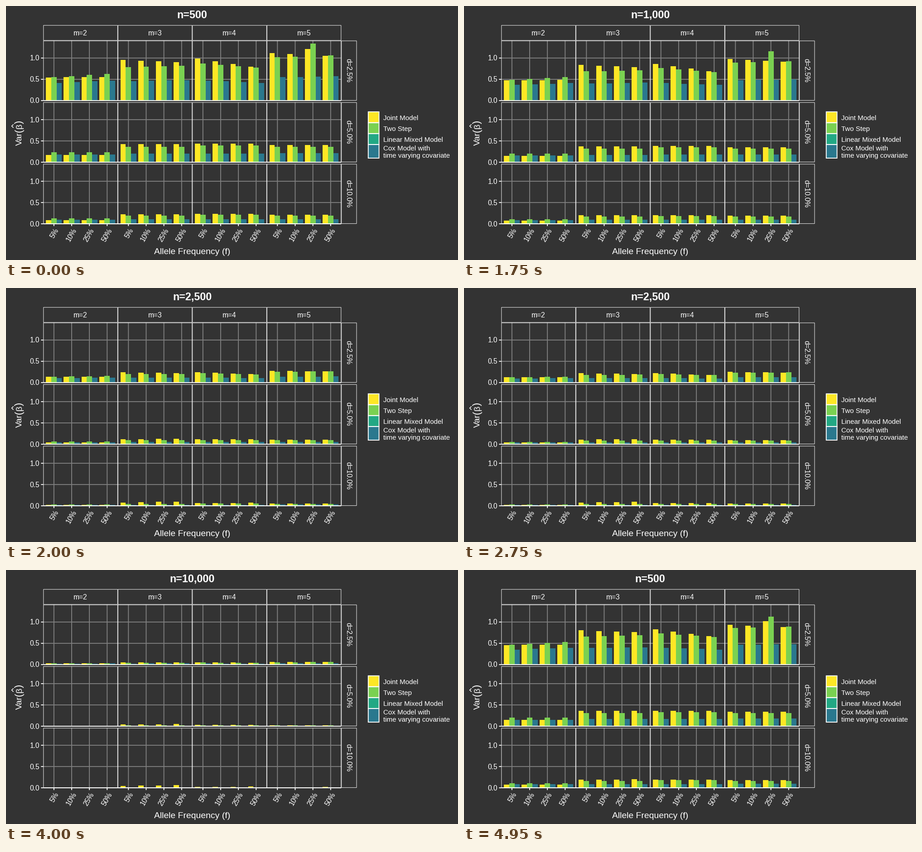
A matplotlib script for the animation above (5 s loop, 998 by 561 pixels).

```python
import numpy as np
import matplotlib.pyplot as plt
from matplotlib.animation import FuncAnimation
from matplotlib.patches import Rectangle

W, H, DPI = 998, 561, 128
PT = 72 / DPI                      # points per pixel
BG, GRID, FG = "#333333", "#7f7f7f", "white"
YELLOW, GREEN, TEAL, BLUE = "#fde725", "#7ad151", "#22a884", "#2a788e"
SMALL, MEDIUM, LARGE = 15.55, 19.44, 23.3
LINE = 1.89

SIZES = ["n=500", "n=1,000", "n=2,500", "n=5,000", "n=10,000"]
FREQS = ["5%", "10%", "25%", "50%"]
DROPOUT = ["d=2.5%", "d=5.0%", "d=10.0%"]

LEFT, PANEL_W, PANEL_H, STRIP = 82.3, 164.5, 132.4, 34.2
EDGES = LEFT + PANEL_W * np.arange(5)
BASES = 208.9 + 136.1 * np.arange(3)
RIGHT, TOP = EDGES[-1], BASES[0] - PANEL_H
UNIT = 94
STEP = PANEL_W / 4.2
BAR = 0.3 * STEP


def variances():
    """Bar heights with axes: n, method, dropout, m, frequency."""
    low = np.array([[0.55, 0.93, 0.89, 1.08],
                    [0.59, 0.80, 0.82, 1.04],
                    [0.445, 0.47, 0.445, 0.56]])
    mid = np.array([[0.172, 0.425, 0.434, 0.405],
                    [0.235, 0.367, 0.397, 0.367],
                    [0.183, 0.20, 0.203, 0.21]])
    base = np.stack([low, mid, 0.53 * mid], axis=1)[..., None]

    # Only the lowest dropout shows a trend over allele frequency
    f = np.linspace(-0.5, 0.5, 4)
    tilt = np.add.outer([-0.1, 0, 0], [0.12, 0.04, -0.12, 0.04])
    trend = np.ones((3, 3, 4, 4))
    trend[:, 0] += tilt[..., None] * f

    # The joint model keeps a bias that large samples do not remove
    bias = np.zeros((3, 3, 4, 4))
    bias[0] = np.multiply.outer(
        np.outer([0, 0.022, 0.045], [0, 1, 0.3, 0.1]), 1 + 0.6 * f)

    scale = np.reshape([1, 1, 0.25, 0.114, 0.055], (5, 1, 1, 1, 1))
    v = scale * base * trend + (1 - scale) * bias

    # Outliers in small samples at m=5, f=25%
    v[0, 0, 0, 3, 2] *= 1.13
    v[:2, 1, 0, 3, 2] *= 1.275
    return v


states = variances()

plt.rcParams["font.family"] = "Liberation Sans"
fig = plt.figure(figsize=(W / DPI, H / DPI), dpi=DPI, facecolor=BG)
ax = fig.add_axes([0, 0, 1, 1])
ax.set(xlim=(0, W), ylim=(H, 0))
ax.axis("off")


def text(x, y, s, size=SMALL, ha="center", angle=0, **kw):
    return ax.text(x, y, s, size=size * PT, color=FG, ha=ha, va="baseline",
                   rotation=angle, rotation_mode="anchor", **kw)


def line(x, y, color=FG, width=LINE, z=4):
    ax.plot(x, y, color=color, lw=width * PT, zorder=z, snap=False,
            solid_capstyle="butt")


def fill(x, y, w, h, color):
    return ax.add_patch(Rectangle((x, y), w, h, fc=color, ec="none", lw=0,
                                  antialiased=False, zorder=2))


def frame(x, y, w, h):
    """Border whose outer half is clipped away."""
    t = LINE / 2
    ax.add_patch(Rectangle((x + t / 2, y + t / 2), w - t, h - t, fill=False,
                           ec=FG, lw=t * PT, snap=False, zorder=3))


def center(m, f):
    return EDGES[m] + (0.6 + f) * STEP


# Panels, strips and axes
for m, x0 in enumerate(EDGES[:-1]):
    frame(x0, TOP - STRIP, PANEL_W, STRIP)
    text(x0 + PANEL_W / 2, 65, f"m={m + 2}")
    for base in BASES:
        frame(x0, base - PANEL_H, PANEL_W, PANEL_H)
    for f, label in enumerate(FREQS):
        x = center(m, f)
        for base in BASES:
            line([x, x], [base - PANEL_H, base], GRID, z=1)
        line([x, x], [BASES[-1], BASES[-1] + 5])
        text(x + 11, 494.8, label, ha="right", angle=60)

for base, label in zip(BASES, DROPOUT):
    line([LEFT, RIGHT], [base, base])
    frame(RIGHT, base - PANEL_H, STRIP, PANEL_H)
    text(751.8, base - PANEL_H / 2, label, angle=270)
    for v in (0, 0.5, 1):
        y = base - v * UNIT
        if v:
            line([LEFT, RIGHT], [y, y], GRID, z=1)
        line([LEFT - 5, LEFT], [y, y])
        text(74, y + 5.5, f"{v:.1f}", ha="right")

text(410.8, 547.5, "Allele Frequency (f)", MEDIUM)
for y, s, size in ((308, "Var", MEDIUM), (279, "(", 22),
                   (271.3, "β", MEDIUM), (259.5, ")", 22)):
    text(34.5, y, s, size, ha="left", angle=90)
line([16.5, 12.5, 16.5], [269, 265.2, 261.4], width=1.5)

# Legend
keys = [233.7, 257.7, 281.8, 305.9, 336]
for y0, y1, color in zip(keys, keys[1:], (YELLOW, GREEN, TEAL, BLUE)):
    fill(799.8, y0, 23.8, y1 - y0, color)
    ax.add_patch(Rectangle((799.8, y0), 23.8, y1 - y0, fill=False, ec=FG,
                           lw=LINE * PT, snap=False, zorder=3))
for y, s in ((251.5, "Joint Model"), (275.5, "Two Step"),
             (299.5, "Linear Mixed Model"), (318.7, "Cox Model with"),
             (335.2, "time varying covariate")):
    text(833.3, y, s, 15.15, ha="left")

title = text(411.2, 26.8, "", LARGE, weight="bold")
bars = []
for k, color in enumerate((YELLOW, GREEN, BLUE)):
    for base in BASES:
        for m in range(4):
            for f in range(4):
                x = center(m, f) + (k - 1.5) * BAR
                bars.append((fill(x, base, BAR, 0, color), base))


def update(i):
    """Hold each state, then move linearly to the next in six steps."""
    s, k = divmod(i, 20)
    p = max(0, k - 14) / 6
    nxt = (s + 1) % len(SIZES)
    heights = ((1 - p) * states[s] + p * states[nxt]).ravel() * UNIT
    for (bar, base), h in zip(bars, heights):
        bar.set_y(base - h)
        bar.set_height(h)
    title.set_text(SIZES[nxt if p >= 0.5 else s])
    return [title]


anim = FuncAnimation(fig, update, frames=100, interval=50, repeat=True)
plt.show()
```
